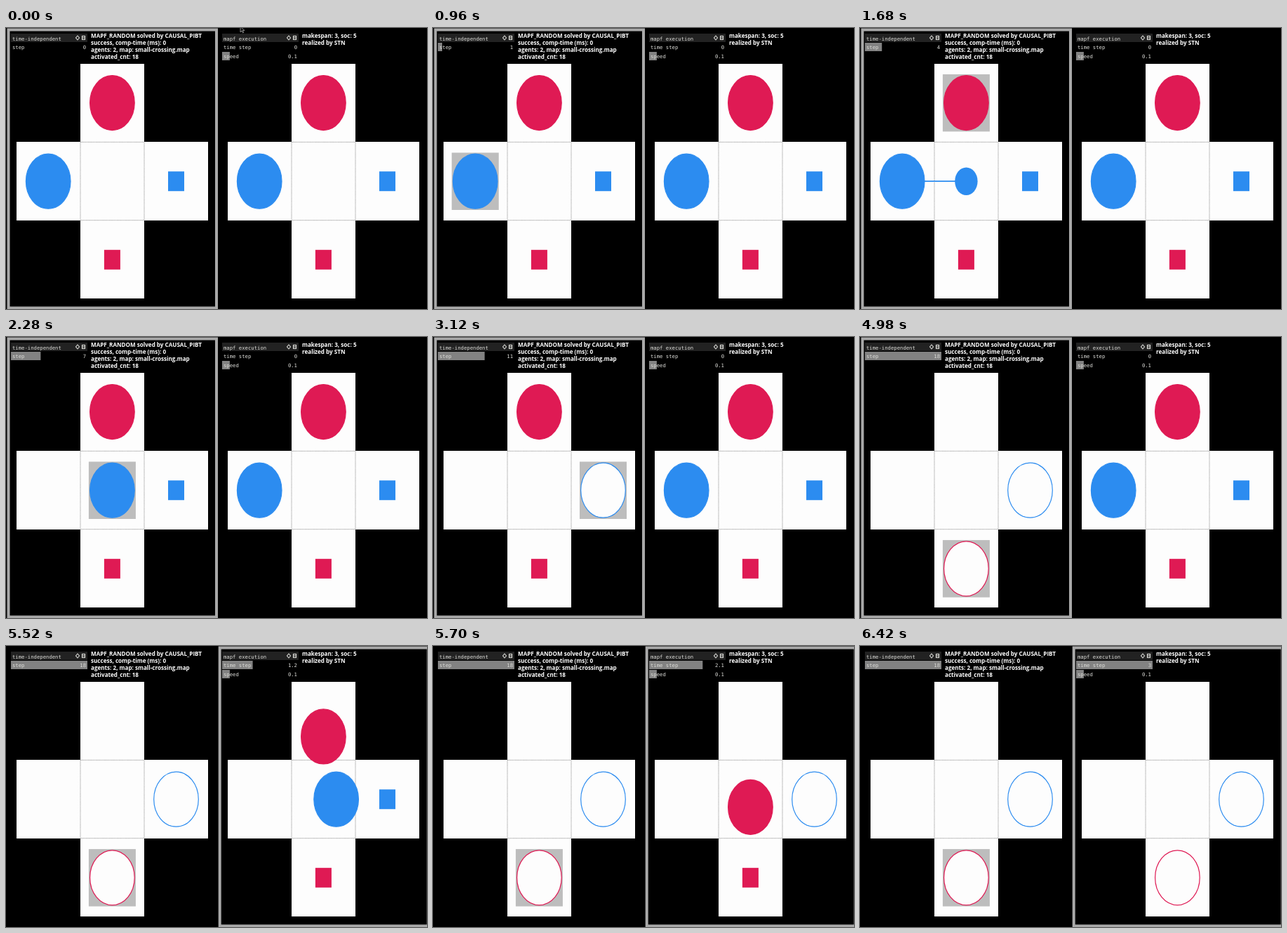
Write an HTML page that moves like this. It is 600x400 px and loops after 6.48 s.

```html
<!DOCTYPE html>
<html lang="en">
<head>
<meta charset="utf-8">
<title>Small crossing</title>
<style>
  html, body { margin: 0; width: 100%; height: 100%; overflow: hidden; background: #000; }
  svg { display: block; width: 600px; height: 400px; }
  .title { font: bold 8.1px "Open Sans", "Noto Sans", sans-serif; fill: #fff; }
  .gui { font: 7.25px "DejaVu Sans Mono", monospace; fill: #dcdcd8; }
  .end { text-anchor: end; }
  .bar { fill: #828282; }
  .head { fill: #222; }
  .cell { fill: #fdfdfd; }
  .grid { fill: none; stroke: #8e8e8e; stroke-width: .8; }
  .active { fill: #bdbdbd; }
  .focus { fill: none; stroke: #a9a9a9; stroke-width: 4; }
  .icon { fill: none; stroke: #dcdcd8; stroke-width: 1.1; }
</style>
</head>
<body>
<svg id="stage" viewBox="0 0 600 400"></svg>
<script>
const LOOP = 6480, TICK = 60;
const STEP_START = 760, STEP_MS = 200, LAST_STEP = 18;
const FOCUS_AT = 5040, PLAY_AT = 5280, PLAY_RATE = 0.005, MAKESPAN = 3;
const CURSOR_OFF = 240;
const BLUE = '#2c8cf0', RED = '#df1a54', PAPER = '#fdfdfd';
const PANEL_DX = 301, BAR_W = 109;

const stage = document.getElementById('stage');
const clamp = (v, lo, hi) => Math.min(hi, Math.max(lo, v));
const set = (el, attrs) => {
  for (const k in attrs) el.setAttribute(k, attrs[k]);
  return el;
};
const add = (parent, tag, attrs, text) => {
  const el = set(document.createElementNS('http://www.w3.org/2000/svg', tag), attrs);
  if (text !== undefined) el.textContent = text;
  return parent.appendChild(el);
};
const show = (el, on) => el.setAttribute('visibility', on ? 'visible' : 'hidden');

// Cell centres on the cross-shaped map
const LEFT = [60.2, 218.2], MID = [151.4, 218.2], RIGHT = [242.5, 218.2];
const TOP = [151.4, 106.6], BOTTOM = [151.4, 329.8];

function makePanel(dx, name, rows, titles) {
  const g = add(stage, 'g', { transform: `translate(${dx} 0)` });
  add(g, 'rect', { class: 'head', x: 7, y: 8, width: BAR_W, height: 12 });
  add(g, 'text', { class: 'gui', x: 9, y: 17.5 }, name);
  add(g, 'path', { class: 'icon', d: 'M102 11l2.5 3-2.5 3-2.5-3z' });
  add(g, 'rect', { class: 'icon', x: 108.5, y: 11.5, width: 4, height: 5 });
  add(g, 'path', { class: 'icon', d: 'M109 14h3' });

  const sliders = rows.map((label, i) => {
    const y = 21 + i * 13;
    const bar = add(g, 'rect', { class: 'bar', x: 7, y, width: 0, height: 12 });
    add(g, 'text', { class: 'gui', x: 9, y: y + 9 }, label);
    const value = add(g, 'text', { class: 'gui end', x: 114, y: y + 9 }, '0');
    return { bar, value };
  });
  titles.forEach((t, i) => add(g, 'text', { class: 'title', x: 121, y: 13.7 + i * 10 }, t));

  add(g, 'path', { class: 'cell', d: 'M106 51h91v111h91v112h-91v111h-91v-111h-91v-112h91z' });
  add(g, 'path', { class: 'grid', 'stroke-dasharray': '1.5 .7', d: 'M106 162.4h91v111.3h-91z' });

  const goals = [[RIGHT, BLUE], [BOTTOM, RED]].map(([p, fill]) =>
    add(g, 'rect', { x: p[0] - 11.5, y: p[1] - 14, width: 23, height: 28, fill }));
  const active = add(g, 'rect', { class: 'active', width: 67, height: 81.5 });
  const agents = [BLUE, RED].map(color => ({
    color,
    link: add(g, 'line', { stroke: color, 'stroke-width': 1.8 }),
    head: add(g, 'ellipse', { rx: 16.2, ry: 19.8, fill: color }),
    body: add(g, 'ellipse', { rx: 31.8, ry: 39, stroke: color, 'stroke-width': 1.2 })
  }));
  return { sliders, goals, active, agents };
}

function setSlider({ bar, value }, v, max) {
  bar.setAttribute('width', BAR_W * v / max);
  value.textContent = +v.toFixed(1);
}

function setAgent(panel, i, at, next, done) {
  const { color, link, head, body } = panel.agents[i];
  set(body, { cx: at[0], cy: at[1], fill: done ? PAPER : color });
  show(link, next);
  show(head, next);
  if (next) {
    set(link, { x1: at[0], y1: at[1], x2: next[0], y2: next[1] });
    set(head, { cx: next[0], cy: next[1] });
  }
  show(panel.goals[i], !done);
}

const left = makePanel(0, 'time-independent', ['step'], [
  'MAPF_RANDOM solved by CAUSAL_PIBT', 'success, comp-time (ms): 0',
  'agents: 2, map: small-crossing.map', 'activated_cnt: 18']);
const right = makePanel(PANEL_DX, 'mapf execution', ['time step', 'speed'],
  ['makespan: 3, soc: 5', 'realized by STN']);
show(right.active, false);
setSlider(right.sliders[1], 0.1, 1);

// The right window reaches past the stage edge
const focus = add(stage, 'rect', { class: 'focus', y: 2.5, height: 396 });
const cursor = add(stage, 'path', {
  d: 'M334-2v8l2-2 1.5 3 1.3-.7-1.5-2.8h2.7z', fill: '#111', stroke: '#b8b8b8', 'stroke-width': .7
});

// An agent extends towards the next cell, then contracts into it
function traverse(path, step, [out1, in1, out2, in2]) {
  const [a, b, c] = path;
  if (step < out1) return [a, null];
  if (step < in1) return [a, b];
  if (step < out2) return [b, null];
  if (step < in2) return [b, c];
  return [c, null];
}

function drawPlan(step) {
  const blue = traverse([LEFT, MID, RIGHT], step, [3, 5, 9, 11]);
  const red = traverse([TOP, MID, BOTTOM], step, [14, 15, 17, 18]);
  setAgent(left, 0, ...blue, step >= 11);
  setAgent(left, 1, ...red, step >= 18);
  const [x, y] = (step < 12 && step % 2 ? blue : red)[0];
  set(left.active, { x: x - 33.5, y: y - 40.7 });
  show(left.active, step > 0);
  setSlider(left.sliders[0], step, LAST_STEP);
}

function along(path, u) {
  const i = Math.min(Math.floor(u), path.length - 2), f = u - i;
  return path[i].map((v, k) => v + (path[i + 1][k] - v) * f);
}

function drawRun(time) {
  setAgent(right, 0, along([LEFT, MID, RIGHT, RIGHT], time), null, time >= 2);
  setAgent(right, 1, along([TOP, TOP, MID, BOTTOM], time), null, time >= MAKESPAN);
  setSlider(right.sliders[0], time, MAKESPAN);
}

function draw(now) {
  const t = Math.floor((now % LOOP) / TICK) * TICK;
  drawPlan(clamp(Math.floor((t - STEP_START) / STEP_MS), 0, LAST_STEP));
  drawRun(clamp((t - PLAY_AT) * PLAY_RATE, 0, MAKESPAN));
  const onLeft = t < FOCUS_AT;
  set(focus, { x: onLeft ? 3.5 : 304.7, width: onLeft ? 296.5 : 297 });
  show(cursor, t < CURSOR_OFF);
}

let start;
function frame(now) {
  start ??= now;
  draw(now - start);
  requestAnimationFrame(frame);
}
draw(0);
requestAnimationFrame(frame);
</script>
</body>
</html>
```
